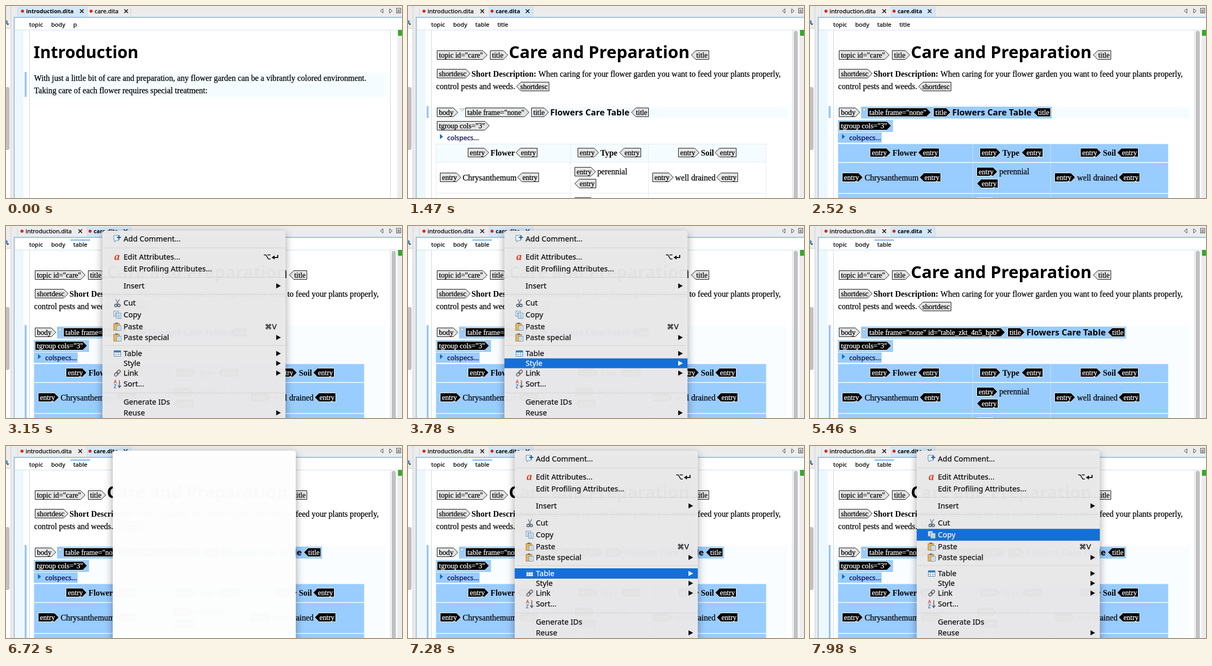
Animation of 768 by 372 pixels, one loop 8 s. Source, as an HTML page:

```html
<!DOCTYPE html>
<html lang="en">
<head>
<meta charset="utf-8">
<title>Editor</title>
<style>
html, body { margin: 0; width: 100%; height: 100%; overflow: hidden; background: #fff; }
svg { display: block; width: 768px; height: 372px; }
text { font-family: "Liberation Serif", serif; stroke-width: .25px; }
.ui { font-family: "Noto Sans", sans-serif; }
.key { font-family: "DejaVu Sans", sans-serif; }
.bold { font-weight: bold; stroke-width: 0; }
.shadow { filter: drop-shadow(0 5px 8px rgba(0, 0, 0, .38)); }
</style>
</head>
<body>
<svg id="stage" viewBox="0 0 768 372"></svg>
<script>
const stage = document.getElementById('stage');
const LOOP = 8000;
const SELECT = '#99ccff', FOCUS = '#f5fcff', BAR = '#9dc8f0';

// Each step changes only the listed parts of the view.
const steps = [
  [0, { doc: 'intro', caret: false, selected: false, element: false, ids: false, menu: 0, hover: '', sub: '', blank: false, dim: false }],
  [1470, { doc: 'care' }],
  [1960, { caret: true }],
  [2520, { caret: false, selected: true }],
  [3150, { element: true, menu: 187 }],
  [3360, { hover: 'Paste special' }],
  [3430, { sub: 'Paste special' }],
  [3500, { hover: 'Table', sub: 'Table' }],
  [3780, { hover: 'Style', sub: '' }],
  [3990, { hover: 'Link' }],
  [4200, { sub: 'Link' }],
  [4410, { hover: 'Sort...', sub: '' }],
  [4480, { hover: 'Generate IDs' }],
  [4830, { hover: '' }],
  [4900, { hover: 'Generate IDs' }],
  [4970, { hover: '', menu: 0, ids: true, dim: true }],
  [5460, { dim: false }],
  [6720, { menu: 207, blank: true }],
  [6790, { blank: false }],
  [6930, { hover: 'Paste special' }],
  [7000, { sub: 'Paste special' }],
  [7280, { hover: 'Table', sub: '' }],
  [7490, { sub: 'Table' }],
  [7770, { sub: '' }],
  [7840, { hover: 'Paste special' }],
  [7910, { hover: 'Paste' }],
  [7980, { hover: 'Copy' }]
];
let last = {};
const views = steps.map(([at, change]) => ({ at, view: last = { ...last, ...change } }));

// label, centre, row height, icon, trailing mark
const items = [
  ['Add Comment...', 25, 23, 'comment'],
  ['Edit Attributes...', 60, 23, 'attr', 'return'],
  ['Edit Profiling Attributes...', 83, 20],
  ['Insert', 116, 20, '', 'more'],
  ['Cut', 149, 23, 'cut'],
  ['Copy', 172, 23, 'copy'],
  ['Paste', 195, 22, 'paste', 'key'],
  ['Paste special', 216, 20, 'paste', 'more'],
  ['Table', 247, 20, 'table', 'more'],
  ['Style', 266, 19, '', 'more'],
  ['Link', 285, 19, 'link', 'more'],
  ['Sort...', 306, 21, 'sort'],
  ['Generate IDs', 341, 20],
  ['Reuse', 362, 20, '', 'more']
];
const subs = {
  'Paste special': [203, ['Paste as XML', 'Paste as text', 'Paste as reference', 'Paste as link']],
  Table: [233, ['Insert Rows...', 'Insert Columns...', 'Delete Row', 'Table Properties...']],
  Link: [272, ['Cross Reference...', 'File Reference...', 'Web Link...']]
};

const rect = (x, y, w, h, fill, more = '') => `<rect x="${x}" y="${y}" width="${w}" height="${h}" fill="${fill}" ${more}/>`;
const path = (d, fill, more = '') => `<path d="${d}" fill="${fill}" ${more}/>`;
const line = (d, color, w = 1) => path(d, 'none', `stroke="${color}" stroke-width="${w}"`);
const dot = (x, y, r, fill, more = '') => `<circle cx="${x}" cy="${y}" r="${r}" fill="${fill}" ${more}/>`;
const text = (s, x, y, size = 15.7, cls = '', ink = '#000', more = '') =>
  `<text x="${x}" y="${y}" class="${cls}" font-size="${size}" fill="${ink}" stroke="${ink}" ${more}>${s}</text>`;

function tag(s, x0, x1, y, end, dark) {
  const [flat, neck, tip] = end ? [x1 - .5, x0 + 9, x0 + .5] : [x0 + .5, x1 - 9, x1 - .5];
  const shape = path(`M${flat} ${y - 8.5}H${neck}L${tip} ${y}L${neck} ${y + 8.5}H${flat}Z`,
    dark ? '#000' : '#e4e4e4', `stroke="${dark ? '#eef6ff' : '#111'}"`);
  return shape + text(s, end ? x1 - 3 : x0 + 4, y + 5, 14.1, '', dark ? '#fff' : '#000',
    end ? 'text-anchor="end"' : '');
}

const tab = (s, x, active, closeX) =>
  dot(x - 7, 10, 3, '#d92a1c') +
  text(s, x, 14, active ? 10.8 : 11.4, active ? 'ui bold' : 'ui') +
  line(`M${closeX - 3.5} 6.5l7 7m0-7l-7 7`, '#111', 1.7);

function chrome(v) {
  const intro = v.doc === 'intro';
  const crumbs = ['topic', 'body', intro ? 'p' : 'table'];
  if (!intro && !v.element) crumbs.push('title');
  return rect(0, 0, 768, 372, '#fff') +
    rect(0, 0, 768, 22, '#ececec') +
    rect(0, 22, 9, 22, '#ececec') + rect(9, 0, 7, 372, '#ebebed') +
    line('M0 43.5H9M9.5 0V372', '#cfcfd2') +
    dot(0, 31, 3.5, '#3c8fd4') + path('M1 34h5l-2.5 3z', '#222') +
    rect(-4, 157, 11, 122, '#c1c1c3', 'rx="4"') +
    (intro ? rect(22, 1, 135, 20, '#d3e7f8') : rect(158, 1, 84, 20, v.dim ? '#e3e9ee' : '#d3e7f8')) +
    line('M22.5 2V20M157.5 2V20M242.5 2V20', '#cbd5de') +
    tab('introduction.dita', intro ? 39 : 38, intro, intro ? 147 : 144) +
    tab('care.dita', intro ? 172 : 170, !intro, intro ? 233 : 232) +
    path('M731 5.5v8l-5-4zM744 5.5v8l5-4z', '#fff', 'stroke="#333"') +
    rect(757.5, 4.5, 8, 9, '#fff', 'stroke="#444"') + line('M759 7.5H764M759 9.5H764M759 11.5H764', '#444') +
    line('M16 372V22H768', '#9fc0dd', 2) +
    line('M17 46.5H768', '#cfdfec') +
    rect(18, 47, 16, 325, '#ecf8fd') +
    line('M45.5 47V372M745.5 47V372', '#ccd6e2') +
    rect(759, 47, 9, 325, '#ececee') + rect(761, 47, 8, 10, '#2fae1f', 'stroke="#258a1a"') +
    (intro ? '' : rect(748, 48, 8, 330, '#c1c1c3', 'rx="4"')) +
    (v.element ? rect(125, 26, 38, 2.5, '#83bdf0') : '') +
    crumbs.map((s, i) => text(s, 45 + i * 42.8, 40, 11.5, 'ui')).join('');
}

const intro = () =>
  rect(50, 129, 686, 47, FOCUS) + rect(36, 128, 4, 48, BAR) +
  text('Introduction', 53.5, 101, 32, 'ui bold') +
  text('With just a little bit of care and preparation, any flower garden can be a vibrantly colored environment.', 54.5, 145, 15.65) +
  text('Taking care of each flower requires special treatment:', 54.5, 169, 15.65);

function care(v) {
  const on = v.selected, shift = v.ids ? 144 : 0;
  const id = v.ids ? ' id="table_zkt_4n5_hpb"' : '';
  const pair = (s, x0, x1, tx, x2, y, cls) =>
    tag('entry', x0, x0 + 41, y, false, on) + text(s, tx, y + 5.5, 15.8, cls) + tag('entry', x1, x2, y, true, on);
  let out = v.element
    ? rect(50, 194, 686, 178, '#f9fdff') + rect(36, 192, 4, 180, BAR)
    : rect(50, 196, 686, 21, FOCUS) + rect(36, 194, 4, 23, BAR);
  out += tag('topic id="care"', 56, 154, 95) + tag('title', 159, 194, 95) +
    text('Care and Preparation', 195.5, 101, 33, 'ui bold') + tag('title', 549, 584, 95, true) +
    tag('shortdesc', 56, 121, 131) + text('Short Description:', 123, 137, 15.9, 'bold') +
    text('When caring for your flower garden you want to feed your plants properly,', 253, 137) +
    text('control pests and weeds.', 54.5, 161) + tag('shortdesc', 210, 274, 156, true) +
    tag('body', 56, 97, 206);
  out += on
    ? rect(99, 195, 370 + shift, 23, SELECT) + rect(54, 221, 107, 23, SELECT) + rect(54, 245, 85, 20, SELECT) +
      rect(54, 268, 640, 34, SELECT) + rect(54, 304, 640, 58, SELECT) + rect(54, 364, 640, 8, SELECT)
    : rect(54, 267, 641, 35, FOCUS);
  out += line('M54 267.5H695M54 302.5H695M54 362.5H695M54.5 267V372M315.5 267V372M466.5 267V372M694.5 267V372',
    on ? '#c9e3fb' : '#e6eaee');
  out += path('M101 199h8l-4 5z', '#fff', 'stroke="#888" stroke-width=".8"') +
    tag(`table frame="none"${id}`, 111, 235 + shift, 206, false, on) +
    tag('title', 239 + shift, 273 + shift, 206, false, on) +
    text('Flowers Care Table', 275.7 + shift, 212, 16.6, 'ui bold') +
    tag('title', 433 + shift, 467 + shift, 206, true, on) +
    tag('tgroup cols="3"', 56, 158, 232, false, on) +
    path('M62 248l6 5-6 5z', '#1470b4') + text('colspecs...', 76, 260, 12.9, 'ui', '#000050') +
    pair('Flower', 116, 209, 160, 251, 284, 'bold') +
    pair('Type', 329, 410, 373, 452, 284, 'bold') +
    pair('Soil', 524, 595, 568, 637, 284, 'bold') +
    pair('Chrysanthemum', 62, 212, 106, 254, 332, '') +
    tag('entry', 323, 364, 321, false, on) + text('perennial', 367, 326) + tag('entry', 323, 365, 344, true, on) +
    pair('well drained', 474, 598, 518, 640, 332, '') +
    tag('entry', 323, 364, 380, false, on);
  if (v.caret) out += rect(430, 196, 1.3, 19, '#000');
  return out;
}

// Icons are drawn around 0,0.
const icons = {
  comment: () => path('M-7-7H3V3H-2L-5 6V3H-7Z', '#e6f0f8', 'stroke="#5f87a6"') + line('M3-7V1M-1-3H7', '#1f5e93', 2.2),
  attr: () => text('a', -6, 6, 21, 'bold', '#e0401f', 'font-style="italic"'),
  cut: () => line('M-3-7L2 3M4-7L-2 3', '#7b858d', 1.6) +
    [-3, 3].map(x => dot(x, 5, 2.4, 'none', 'stroke="#456" stroke-width="1.5"')).join(''),
  copy: () => [[-7, -7], [-2, -3]].map(([x, y]) =>
    rect(x, y, 9, 10, '#f5f9fc', 'stroke="#5c8db5"') + line(`M${x + 2} ${y + 3}h5m-5 2.5h5m-5 2.5h5`, '#5c8db5')).join(''),
  paste: () => rect(-7, -6, 11, 13, '#e9b65c', 'stroke="#a87a2c"') + rect(-4, -8, 5, 3, '#777') +
    rect(-1, -2, 8, 9, '#f6fafd', 'stroke="#5c8db5"') + line('M1 1H5M1 4H5', '#5c8db5'),
  table: () => rect(-6.5, -5.5, 13, 11, '#fff', 'stroke="#5584ab"') + rect(-7, -6, 14, 4, '#3680c0') +
    line('M-6 1.5H6M-2.5-2V5M2.5-2V5', '#8aaac5'),
  link: () => [-3, 3].map(x => rect(x - 4, -2.5, 8, 5, 'none', 'rx="2.5" stroke="#666" stroke-width="1.6" transform="rotate(-45)"')).join(''),
  sort: () => text('A', -7, -1, 9, 'ui', '#c33') + text('Z', -7, 8, 9, 'ui', '#26b') + line('M4-7V6M1 3L4 7L7 3', '#555', 1.4)
};

const marks = {
  more: (x, y, ink) => path(`M${x + 337} ${y - 5}l9 5-9 5z`, ink),
  key: (x, y, ink) => text('⌘V', x + 338, y + 5, 13.6, 'key', ink, 'text-anchor="end"'),
  return: (x, y, ink) => line(`M${x + 313} ${y - 4}h4l5 8h4M${x + 320} ${y - 4}h6`, ink, 1.5) +
    line(`M${x + 340} ${y - 4}V${y + 1}H${x + 332}`, ink, 2) + path(`M${x + 328} ${y + 1}l6-4v8z`, ink)
};

const panel = (x, y, w, h, fill) => rect(x, y, w, h, fill, 'rx="5" class="shadow"');

function menu({ menu: x, hover, sub, blank }) {
  if (blank) return panel(x, 9, 355, 400, 'rgba(255,255,255,.98)');
  let out = panel(x, 9, 355, 400, 'rgba(236,235,236,.965)');
  for (const y of [42.5, 99.5, 132.5, 231.5, 323.5]) out += line(`M${x + 1} ${y}H${x + 354}`, '#d3d3d4');
  for (const [label, y, h, icon, mark] of items) {
    const on = label === hover, ink = on ? '#fff' : '#111';
    if (on) out += rect(x, y - h / 2, 355, h, '#146fd8');
    if (icon) out += `<g transform="translate(${x + 29} ${y})">${icons[icon]()}</g>`;
    out += text(label, x + 41, y + 5, 14.6, 'ui', ink);
    if (mark) out += marks[mark](x, y, ink);
  }
  if (sub) {
    const [top, labels] = subs[sub], left = x + 355;
    out += panel(left, top, 260, labels.length * 20 + 8, 'rgba(238,238,239,.97)') +
      labels.map((s, i) => text(s, left + 41, top + 19 + i * 20, 14.6, 'ui')).join('');
  }
  return out;
}

const draw = v => chrome(v) + (v.doc === 'intro' ? intro() : care(v)) + (v.menu ? menu(v) : '');

const start = performance.now();
let shown = null;
function tick() {
  const t = (performance.now() - start) % LOOP;
  const now = views.findLast(s => s.at <= t) || views[0];
  if (now !== shown) {
    shown = now;
    stage.innerHTML = draw(now.view);
  }
  requestAnimationFrame(tick);
}
tick();
</script>
</body>
</html>
```
